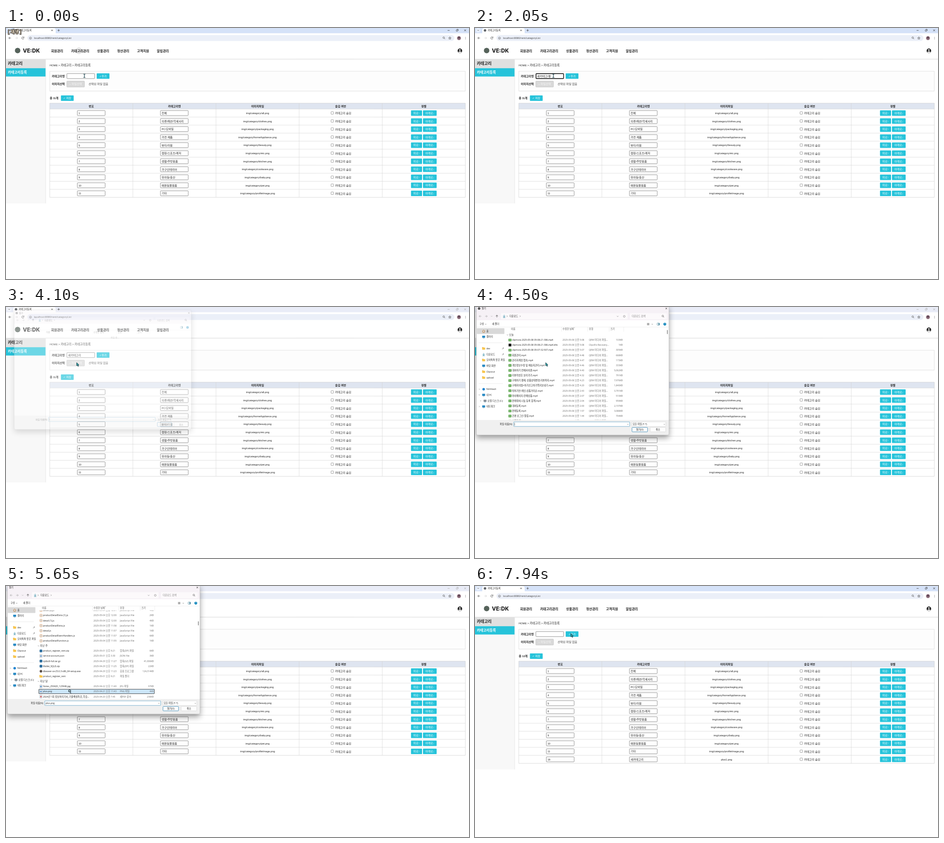
These frames come from a looping animation (1016 px wide and 551 px high, 8 s). An HTML page with a canvas:

```html
<!DOCTYPE html>
<html lang="ko">
<head>
<meta charset="utf-8">
<title>카테고리등록</title>
<style>
html, body { margin: 0; width: 100%; height: 100%; overflow: hidden; background: #fff; }
canvas { display: block; width: 1016px; height: 551px; }
</style>
</head>
<body>
<canvas id="stage"></canvas>
<script>
const W = 1016, H = 551, LOOP = 8000;
const cv = document.getElementById('stage'), g = cv.getContext('2d');
const dpr = window.devicePixelRatio || 1;
cv.width = W * dpr;
cv.height = H * dpr;

const TEAL = '#26c3da', INK = '#222', GREY = '#767676';
const PAGE = '"Liberation Sans", "DejaVu Sans", sans-serif';
const UI = '"Open Sans", "DejaVu Sans", sans-serif';
const KO = '"Noto Sans CJK KR", "Noto Sans CJK", "Noto Sans CJK JP", sans-serif';

// Text centred on y; Hangul and Latin runs use their own fonts.
function text(s, x, y, size, color = INK, { bold = 400, align = 'l', ui = false } = {}) {
  const runs = s.split(/([가-힣ㄱ-ㅎ]+)/).filter(Boolean).map(str => {
    const ko = /[가-힣ㄱ-ㅎ]/.test(str);
    const font = `${bold} ${ko ? size * (ui ? 1.05 : 1.087) : size}px ${ko ? KO : ui ? UI : PAGE}`;
    g.font = font;
    return { str, font, w: g.measureText(str).width };
  });
  const total = runs.reduce((a, r) => a + r.w, 0);
  if (align === 'c') x -= total / 2;
  if (align === 'r') x -= total;
  g.fillStyle = color;
  for (const r of runs) {
    g.font = r.font;
    g.fillText(r.str, x, y + size * 0.36);
    x += r.w;
  }
}
const ui = (s, x, y, size, color, align) => text(s, x, y, size, color, { ui: true, align });

function box(x, y, w, h, fill, stroke, r = 0, lw = 0.7) {
  g.beginPath();
  g.roundRect(x, y, w, h, r);
  if (fill) { g.fillStyle = fill; g.fill(); }
  if (stroke) { g.strokeStyle = stroke; g.lineWidth = lw; g.stroke(); }
}
function dot(x, y, r, fill, stroke, lw = 0.7) {
  g.beginPath();
  g.arc(x, y, r, 0, 7);
  if (fill) { g.fillStyle = fill; g.fill(); }
  if (stroke) { g.strokeStyle = stroke; g.lineWidth = lw; g.stroke(); }
}
function line(color, lw, ...p) {
  g.beginPath();
  for (let i = 0; i < p.length; i += 2) g.lineTo(p[i], p[i + 1]);
  g.strokeStyle = color;
  g.lineWidth = lw;
  g.stroke();
}
const down = (x, y, c, s = 1.7) => line(c, 0.7, x - s, y - s / 2, x, y + s / 2, x + s, y - s / 2);
const right = (x, y, c, s = 1.5) => line(c, 0.7, x - s / 2, y - s, x + s / 2, y, x - s / 2, y + s);
function arrow(x, y, dx, dy, c) {
  const s = 2.5;
  line(c, 0.8, x - dx * s, y - dy * s, x + dx * s, y + dy * s);
  line(c, 0.8, x + dy * s, y + dx * s, x + dx * s, y + dy * s, x - dy * s, y - dx * s);
}
function search(x, y, c) {
  dot(x, y - 0.5, 1.8, null, c);
  line(c, 0.8, x + 1.3, y + 0.8, x + 3, y + 2.5);
}
const clamp = v => Math.max(0, Math.min(1, v));
const ease = v => (v = clamp(v), v * v * (3 - 2 * v));

// ---------- browser ----------
function browser(active, overlay) {
  const ink = active ? '#333' : '#aaa';
  box(0, 0, W, 18, active ? '#d5e2f8' : '#e9ecf7');
  box(2.5, 0.5, 9, 9, active ? '#e9f0fc' : '#f2f4fa', null, 3);
  down(7, 5, '#333');
  box(16, 0.5, 93, 16, '#fff', null, 4);
  box(0, 11.5, W, 21, '#fff');
  dot(22, 5.2, 2.7, '#5f6368');
  ui('카테고리등록', 28, 5.3, 4.9, INK);
  line('#333', 0.8, 99.5, 3.7, 102.5, 6.7);
  line('#333', 0.8, 102.5, 3.7, 99.5, 6.7);
  line('#444', 0.8, 113, 5.2, 118, 5.2);
  line('#444', 0.8, 115.5, 2.7, 115.5, 7.7);
  line(ink, 0.8, 969, 5.3, 973.5, 5.3);
  box(988, 4, 3.2, 3.2, null, ink, 0.5);
  line(ink, 0.7, 989, 2.8, 992.3, 2.8, 992.3, 6);
  line(ink, 0.8, 1005.5, 3.2, 1009.5, 7.2);
  line(ink, 0.8, 1009.5, 3.2, 1005.5, 7.2);

  arrow(8.5, 22, -1, 0, '#444');
  arrow(23, 22, 1, 0, '#ccc');
  g.beginPath();
  g.arc(37, 22, 2.4, 0.3, 5.4);
  g.strokeStyle = '#444'; g.lineWidth = 0.8; g.stroke();
  line('#444', 0.8, 39.5, 19, 39.5, 21.2, 37.3, 21.2);
  box(47, 15.5, 937, 13, '#ebeff8', null, 6.5);
  dot(53.7, 22.2, 2.3, null, '#555');
  line('#555', 0.7, 53.7, 21.6, 53.7, 23.6);
  ui('localhost:8080/rent/categoryList', 61.5, 22.4, 5.46, '#333');
  search(960.5, 21.7, '#444');
  g.beginPath();
  for (let i = 0; i < 10; i++) {
    const a = i * Math.PI / 5 - Math.PI / 2, r = i % 2 ? 1.3 : 3;
    g.lineTo(974 + r * Math.cos(a), 22.3 + r * Math.sin(a));
  }
  g.closePath();
  g.strokeStyle = '#444'; g.lineWidth = 0.7; g.stroke();
  dot(994, 22.2, 4.2, '#8a6a78');
  dot(994, 21, 1.8, '#4d3a48');
  for (let i = -1; i < 2; i++) dot(1008.3, 22.2 + i * 2, 0.55, '#444');

  if (overlay > 0) {
    g.globalAlpha = overlay;
    g.font = `800 9.8px ${KO}`;
    g.lineJoin = 'round';
    g.strokeStyle = '#1a1410'; g.lineWidth = 1.8;
    g.strokeText('[ 재생 ]', 4, 12);
    g.fillStyle = '#fff3dc';
    g.fillText('[ 재생 ]', 4, 12);
    g.lineJoin = 'miter';
    g.globalAlpha = 1;
  }
}

// ---------- page ----------
const NAV = [['회원관리', 99], ['카테고리관리', 143], ['상품관리', 200], ['정산관리', 244], ['고객지원', 287.5], ['알림관리', 331]];
const ROWS = `전체,all|의류/패션/악세사리,clothes|PC/모바일,packaging|가전 제품,homeAppliance|뷰티/미용,beauty|캠핑/스포츠/레저,etc|생활/주방용품,kitchen|가구인테리어,cookware|유아동/출산,baby|애완동물용품,pet|기타,profileImage`
  .split('|').map((r, i) => {
    const [name, img] = r.split(',');
    return [String(i + 1), name, `img/category/${img}.png`];
  });
const HEADS = ['번호', '카테고리명', '이미지파일', '숨김 여부', '정렬'];
const COL = 182.4, PITCH = 17.62;

function button(s, x, y, w) {
  box(x, y - 6, w, 12, TEAL, null, 1);
  text(s, x + w / 2, y + 0.2, 5.6, '#fff', { align: 'c' });
}
function field(s, x, y) {
  box(x, y - 5.5, 61, 11, '#fff', GREY, 1, 0.8);
  text(s, x + 2.7, y + 0.5, 5.66);
}

function page(s) {
  dot(25.5, 49.5, 6, '#56635b');
  g.font = '800 11.7px Inter, sans-serif';
  g.fillStyle = '#222';
  g.fillText('VE:DK', 37, 54.2);
  if (s.ripple > 0) dot(160, 50, 6.5, `rgba(120,120,120,${0.12 * s.ripple})`, `rgba(90,90,90,${0.4 * s.ripple})`);
  for (const [name, x] of NAV) text(name, x, 50.5, 6.6, INK, { bold: 700 });
  dot(996, 50, 5, '#222');
  dot(996, 48.3, 1.6, '#fff');
  g.beginPath();
  g.ellipse(996, 52.8, 3, 1.6, 0, 0, 7);
  g.fillStyle = '#fff'; g.fill();
  line('#ccc', 0.8, 0, 68.3, W, 68.3);

  const rows = s.added ? [...ROWS, ['16', '새카테고리', 'plus1.png']] : ROWS;
  const end = 177.9 + rows.length * PITCH;
  box(0, 68.8, 87, end - 55.5, '#f8f8f8');
  line('#ddd', 0.7, 87, 69, 87, end + 13.3);
  box(0, 68.8, 86.7, 19.4, '#e0e0e0');
  text('카테고리', 4, 78.5, 8.1, INK, { bold: 700 });
  box(0, 88.2, 86.7, 18.3, TEAL);
  text('카테고리등록', 4, 97.5, 7, '#fff', { bold: 700 });

  text('HOME > 카테고리 > 카테고리등록', 95.7, 82, 5.9);
  box(96, 95, 912, 43.5, '#fdfdfd', '#d5d5d5');
  text('카테고리명', 100.5, 105.7, 5.7, INK, { bold: 700 });
  field(s.typed, 133.6, 105.5);
  if (s.focus) box(133.9, 100.2, 60.5, 10.8, null, '#111', 1, 1.5);
  if (s.caret) line('#111', 0.8, 164.6, 103, 164.6, 109);
  button('✓추가', 199, 105.5, 28);
  text('이미지선택', 100.5, 123.2, 5.7, INK, { bold: 700 });
  box(133.4, 116.6, 38.8, 13, '#d9d9d9', '#bdbdbd', 1);
  text('+ 파일선택', 152.8, 123.4, 5.7, '#f7f7f7', { align: 'c' });
  text(s.file, 181.3, 123.4, 5.7, '#444');
  text(`총 ${rows.length}개`, 96, 154.2, 5.7, INK, { bold: 700 });
  button('✓ 저장', 120.5, 153.9, 28);

  box(96, 165, 912, 12.9, '#dfe5f0');
  HEADS.forEach((h, i) => text(h, 96 + COL * (i + 0.5), 171.7, 5.66, INK, { bold: 700, align: 'c' }));
  rows.forEach(([no, name, img], i) => {
    const y = 186.7 + i * PITCH;
    line('#d5d5d5', 0.7, 96, y - 8.8, 1008, y - 8.8);
    field(no, 156.5, y);
    field(name, 338.9, y);
    text(img, 552, y + 0.2, 5.66, INK, { align: 'c' });
    box(713.2, y - 3, 5.6, 5.6, '#fff', GREY, 1);
    text('카테고리 숨김', 722, y + 0.7, 5.66);
    button('위로↑', 888.7, y, 24.3);
    button('아래로↓', 915, y, 30);
  });
  box(96, 165, 912, end - 165, null, '#ccc');
  for (let i = 1; i < 5; i++) line('#d5d5d5', 0.7, 96 + COL * i, 165, 96 + COL * i, end);
}

// ---------- file dialog ----------
const VIDEO = 'QEM 미디어 파일...', SCRIPT = 'JavaScript File';
const STEP = 11.13, SCROLL = 575.4;
const TODAY = `clipmora 2025-05-08 05-08-21-386.mp4;5:08;103
clipmora 2025-05-08 05-08-21-386.mp4.bfix;5:08;1
clipmora 2025-05-08 05-07-32-507.mp4;5:07;305
회원관리.mp4;4:48;668
관리자계정 접속.mp4;4:47;173
개인정보수정 및 배송지관리.mp4;4:46;333
대여하기 전체사이클.mp4;4:40;5,062
리뷰작성후 보러가기.mp4;4:32;791
구매하기 결제, 상품상태변경,리뷰까지.mp4;4:23;7,976
구매자의찜×하기신고하기쪽지보내기.mp4;4:20;1,840
위치기반-메인,상품거리순.mp4;2:43;3,791
마이페이지-판매상품.mp4;2:07;510
판매대여,나눔 등록 합계.mp4;2:04;959
대여등록.mp4;2:00;2,197
판매등록.mp4;1:57;3,088
간편 로그인-알림.mp4;1:44;704`.split('\n').map(r => {
  const [name, at, kb] = r.split(';');
  return [name, '2025-05-08 오전 ' + at, name.endsWith('bfix') ? 'ClipoFix Recovery...' : VIDEO, kb + 'KB'];
});
const MIDDLE = Array.from({ length: 34 }, (_, i) => i === 9 ? ['이번 주 초'] : i < 9
  ? [`상품등록 (${i + 1}).mp4`, `2025-05-08 오전 1:${40 - i * 3}`, VIDEO, `${(i * 397 + 451) % 977}KB`]
  : [`${['productList', 'detail', 'category'][i % 3]} (${36 - i}).js`, `2025-05-0${i < 20 ? 6 : 5} 오후 ${1 + i % 9}:${10 + i}`, SCRIPT, `${1 + i % 6}KB`]);
const OLDER = `detail (2).js;2025-05-04 오후 12:01;${SCRIPT};4KB
productDetailExtra (1).js;2025-05-04 오후 12:00;${SCRIPT};2KB
detail (1).js;2025-05-04 오후 12:00;${SCRIPT};4KB
productDetailExtra.js;2025-05-04 오전 11:58;${SCRIPT};1KB
detail.js;2025-05-04 오전 11:57;${SCRIPT};1KB
productDetailEventHandlers.js;2025-05-04 오전 11:57;${SCRIPT};6KB
productDetailFunction.js;2025-05-04 오전 11:55;${SCRIPT};1KB
지난 주
product_register_rent.zip;2025-05-01 오후 9:21;압축(ZIP) 파일;6KB
service-account.json;2025-05-01 오후 3:30;JSON File;3KB
ojdbc8-full.tar.gz;2025-04-29 오후 11:27;압축(GZ) 파일;41,006KB
Wallet_SQLD.zip;2025-04-29 오후 11:25;압축(ZIP) 파일;22KB
dbeaver-ce-25.0.3-x86_64-setup.exe;2025-04-29 오후 11:23;응용 프로그램;124,314KB
product_register_rent;2025-05-01 오후 9:21;파일 폴더;
지난 달
Notes_250420_123948.jpg;2025-04-22 오후 11:40;JPG 파일;97KB
plus.png;2025-04-21 오후 11:43;PNG 파일;4KB
2024년 1회 정보처리기사_기출해설특강_학습...;2025-04-20 오전 7:45;새PDF 문서;238KB`.split('\n').map(r => r.split(';'));
const FILES = [['오늘'], ...TODAY, ...MIDDLE, ...OLDER];

function folder(x, y) {
  box(x - 3.3, y - 2.8, 3, 2, '#e0a52f', null, 0.5);
  box(x - 3.3, y - 2, 6.6, 4.8, '#f8c64e', null, 0.7);
}
function icon(type, x, y) {
  if (type === VIDEO) {
    box(x - 3.3, y - 2.8, 6.6, 5.6, '#62a955', null, 0.6);
    line('#e6f5df', 0.7, x - 2, y, x + 2, y);
  } else if (type === SCRIPT) {
    box(x - 2.2, y - 2.7, 4.6, 5.4, '#fff', '#c98a50', 0.8, 0.8);
    line('#444', 0.7, x - 1, y, x + 1.5, y);
  } else if (type === '파일 폴더') folder(x, y);
  else if (type.startsWith('압축')) box(x - 3, y - 3, 6, 6, '#2d6e9e', null, 1.5);
  else if (type.startsWith('Clipo')) box(x - 3, y - 3, 6, 6, '#111', null, 0.6);
  else if (type === '응용 프로그램') dot(x, y, 2.9, '#5b5048');
  else {
    box(x - 2.4, y - 3.1, 4.8, 6.2, '#fff', '#8a93a0', 0.4);
    box(x - 1.4, y - 1.2, 2.8, 2.6, type.includes('PDF') ? '#cf4646' : '#3b83c9');
  }
}

const SIDE = [['홈', 53], ['갤러리', 65.5], ['dev', 91], ['다운로드', 104], ['모아톡톡 받은 파일', 116.5], ['바탕 화면', 129],
  ['Clipocut', 142], ['upload', 155], ['NimVault', 180.5], ['내 PC', 193], ['로컬 디스크 (C:)', 206], ['네트워크', 218.5]];

function sidebar() {
  box(4, 46.5, 60.5, 12.7, '#d9d9d9', null, 1);
  line('#e2e2e2', 0.7, 8, 78.5, 61, 78.5);
  line('#e2e2e2', 0.7, 8, 168, 61, 168);
  g.save();
  g.beginPath();
  g.rect(3, 44, 62, 204);
  g.clip();
  SIDE.forEach(([name, y], i) => {
    const x = i === 10 ? 22 : 19;
    if (i === 0) line('#c07b36', 0.9, x - 3, y, x, y - 2.7, x + 3, y, x + 2, y, x + 2, y + 2.8, x - 2, y + 2.8, x - 2, y);
    else if (i === 3) { arrow(x, y - 0.5, 0, 1, '#1f7f9c'); line('#1f7f9c', 0.8, x - 2.5, y + 3, x + 2.5, y + 3); }
    else if (i === 8) dot(x, y, 2.8, '#2385d0');
    else if ([2, 4, 6, 7].includes(i)) folder(x, y);
    else {
      box(x - 3.2, y - 2.6, 6.4, 4.6, i === 10 ? '#8b9199' : '#2789c4', null, 0.6);
      line('#5d93ad', 0.8, x - 2, y + 2.8, x + 2, y + 2.8);
    }
    ui(name, i === 10 ? 27.5 : 25, y + 0.2, 4.95, INK);
    if (i === 9) down(9.5, y, '#666', 1.4);
    else if (i > 7) right(i === 10 ? 12.5 : 9.5, y, '#777', 1.3);
    if (i === 2 || i === 3) { line('#777', 0.8, 59.5, y + 2, 62, y - 0.5); dot(62, y - 0.8, 1.1, '#888'); }
  });
  g.restore();
}

function fileList(s) {
  g.save();
  g.beginPath();
  g.rect(68, 53.5, 350, 194.5);
  g.clip();
  FILES.forEach(([name, date, type, size], i) => {
    const y = 61.3 + i * STEP - s.scroll;
    if (y < 45 || y > 256) return;
    if (!date) {
      down(71.3, y, '#777', 1.5);
      ui(name, 74.5, y, 5.4, '#333');
      return;
    }
    if (s.picked && name === 'plus.png') box(72, y - 5, 253.5, 9.8, '#cce6f8', '#333', 0.5, 0.9);
    icon(type, 76.7, y);
    ui(name, 81.2, y, 4.95, INK);
    ui(date, 192, y, 4.95, '#666');
    ui(type, 250, y, 4.95, '#666');
    ui(size, 324, y, 4.95, '#666', 'r');
  });
  g.restore();
  box(421.4, 50.5 + 27 * s.scroll / SCROLL, 1.6, 9, '#888', null, 0.8);
}

// The shadow is kept outside the frame so that it never tints a fading dialog.
function shadow() {
  g.save();
  g.beginPath();
  g.rect(-60, -60, 560, 420);
  g.roundRect(3, -4, 422.5, 285, 3);
  g.clip('evenodd');
  g.shadowColor = 'rgba(0,0,0,.4)';
  g.shadowBlur = 13 * dpr;
  g.shadowOffsetY = 6 * dpr;
  box(3, -4, 422.5, 285, '#fff', null, 3);
  g.restore();
}

function dialog(s) {
  g.save();
  const k = s.scale;
  g.globalAlpha = s.alpha;
  g.translate(190 * (1 - k), 127 * (1 - k));
  g.scale(k, k);
  shadow();
  box(3, -4, 422.5, 33, '#f6f1f6', null, [3, 3, 0, 0]);
  box(3, 29, 422.5, 219, '#fff');
  box(3, 248, 422.5, 33, '#f0f0f0', null, [0, 0, 3, 3]);
  box(3, -4, 422.5, 285, null, '#b5b5b5', 3, 0.6);
  if (s.badge) dot(9, 3.3, 2.8, '#555');
  ui('열기', s.badge ? 14.5 : 6.5, 3.5, 4.95, INK);
  line('#333', 0.8, 418, 1.5, 421.5, 5);
  line('#333', 0.8, 421.5, 1.5, 418, 5);

  arrow(11.5, 20.3, -1, 0, '#aaa');
  arrow(24.5, 20.3, 1, 0, '#aaa');
  down(36.5, 20.3, '#999', 1.5);
  arrow(48, 20.3, 0, -1, '#444');
  box(57, 13.5, 278, 13.5, '#fcf9fb', null, 1.5);
  box(340, 13.5, 81, 13.5, '#fcf9fb', null, 1.5);
  arrow(64, 19.6, 0, 1, '#1f7f9c');
  line('#1f7f9c', 0.8, 61.5, 23.3, 66.5, 23.3);
  right(70.5, 20.3, '#666');
  ui('다운로드', 75.5, 20.4, 4.95, INK);
  right(99, 20.3, '#666');
  down(313, 20.5, '#777');
  dot(327.5, 20.5, 2, null, '#777');
  ui('다운로드 검색', 344, 20.5, 4.95, '#777');
  search(412, 20.2, '#555');

  if (s.loaded) {
    ui('구성', 10, 37.6, 4.95, INK);
    down(23.5, 37.8, '#444', 1.2);
    ui('새 폴더', 37.5, 37.6, 4.95, INK);
    for (let i = -1; i < 2; i++) line('#555', 0.8, 377.5, 37.6 + i * 1.7, 382.5, 37.6 + i * 1.7);
    down(389, 37.8, '#444', 1.2);
  }
  box(399.7, 35.3, 5, 4.6, '#fff', '#377b94', 0.5);
  box(402.7, 35.3, 2, 4.6, '#377b94');
  dot(416.5, 37.6, 3.1, '#1689bd');
  ui('?', 416.5, 37.6, 4.6, '#fff', 'c');
  line('#e6e6e6', 0.7, 3, 44, 425, 44);

  ui('이름', 79, 48.7, 4.95, '#555');
  ui('수정한 날짜', 192, 48.7, 4.95, '#555');
  down(218, 45.3, '#888', 1);
  ui('유형', 250, 48.7, 4.95, '#555');
  ui('크기', 297, 48.7, 4.95, '#555');
  for (const x of [190, 247.5, 294.5, 326.3]) line('#e2e2e2', 0.6, x, 44, x, 54);
  if (s.loaded) {
    sidebar();
    fileList(s);
  } else ui('작업 중...', 243, 62, 4.95, '#777', 'c');

  ui('파일 이름(N):', 82.5, 257.3, 4.95, INK, 'r');
  box(85, 252.2, 254.5, 10, '#fff', '#5a9fc4', 0.8, 0.8);
  if (s.picked) ui('plus.png', 87, 257.4, 4.95, INK);
  else line('#222', 0.6, 87, 254.3, 87, 260.3);
  down(335.5, 257.5, '#666', 1.4);
  box(344.3, 252.2, 74.5, 10, '#fff', '#d5d5d5', 0.8);
  ui('모든 파일 (*.*)', 346, 257.4, 4.95, INK);
  down(415.5, 257.5, '#666', 1.4);
  box(344.5, 264.3, 34.2, 9.8, '#fdfdfd', '#3d8ab5', 1.2, 0.9);
  ui('열기(O)', 361.6, 269.3, 4.95, INK, 'c');
  box(384.3, 264.3, 34.2, 9.8, '#fdfdfd', '#d0d0d0', 1.2);
  ui('취소', 401.4, 269.3, 4.95, INK, 'c');
  g.restore();
}

// ---------- pointer ----------
const PATH = [[0, 172, 105], [2050, 172, 105], [2390, 207, 113], [3330, 207, 113], [3800, 155, 122], [4950, 155, 122],
  [5270, 138.5, 227], [6200, 138.5, 227], [6740, 208, 137], [6800, 208, 137], [7000, 210.5, 104.5], [LOOP, 210.5, 104.5]];

function pointer(t) {
  const i = PATH.findIndex((p, n) => n && t <= p[0]);
  const [t0, x0, y0] = PATH[i - 1], [t1, x1, y1] = PATH[i];
  const k = ease((t - t0) / (t1 - t0));
  const x = x0 + (x1 - x0) * k, y = y0 + (y1 - y0) * k;
  if (t < 2120) {
    line('#17404a', 1.2, x, y - 3.5, x, y + 3.5);
    for (const e of [-3.7, 3.7]) line('#17404a', 1, x - 2.2, y + e, x + 2.2, y + e);
  } else if (t > 5440 && t < 5910) {
    dot(x + 1.2, y + 3.3, 2.3, '#b9d4d8', '#26343c', 1.2);
    line('#26343c', 1.2, x + 2.5, y + 5.5, x + 4, y + 8.5);
  } else {
    g.beginPath();
    for (const [dx, dy] of [[0, 0], [0, 7], [1.7, 5.7], [3, 8.4], [4.3, 7.6], [3.1, 5.2], [5.1, 4.9]]) g.lineTo(x + dx, y + dy);
    g.closePath();
    g.fillStyle = '#2fa5a5'; g.fill();
    g.strokeStyle = '#1f3a48'; g.lineWidth = 0.9; g.stroke();
  }
}

// ---------- timeline ----------
const KEYS = [[880, 'ㅅ'], [950, '새'], [1060, '새ㅋ'], [1130, '새카'], [1200, '새카ㅌ'], [1390, '새카테'],
  [1480, '새카테고'], [1570, '새카테골'], [1660, '새카테고리'], [7470, '']];

function draw(t) {
  g.setTransform(dpr, 0, 0, dpr, 0, 0);
  g.fillStyle = '#fff';
  g.fillRect(0, 0, W, H);
  const typed = KEYS.reduce((s, [at, v]) => t >= at ? v : s, '');
  browser(t < 3960 || t >= 5770, 1 - clamp((t - 880) / 140));
  page({
    typed,
    ripple: 1 - clamp(t / 400),
    focus: t >= 330 && t < 3900,
    caret: (t >= 2050 && t < 2590) || (t >= 3050 && t < 3580),
    file: t >= 5700 && t < 7470 ? 'plus.png' : '선택된 파일 없음',
    added: t >= 7470
  });
  if (t >= 4040 && t < 5830) {
    const open = clamp((t - 4040) / 190), shut = clamp((t - 5690) / 140);
    dialog({
      alpha: open * (1 - shut),
      scale: (0.845 + 0.155 * Math.sin(open * Math.PI / 2)) * (1 - 0.1 * shut),
      loaded: t >= 4290,
      badge: t < 4980,
      picked: t >= 5360,
      scroll: SCROLL * ease((t - 4600) / 570)
    });
  }
  pointer(t);
}

const start = performance.now();
function tick() {
  draw((performance.now() - start) % LOOP);
  requestAnimationFrame(tick);
}
tick();
</script>
</body>
</html>
```
